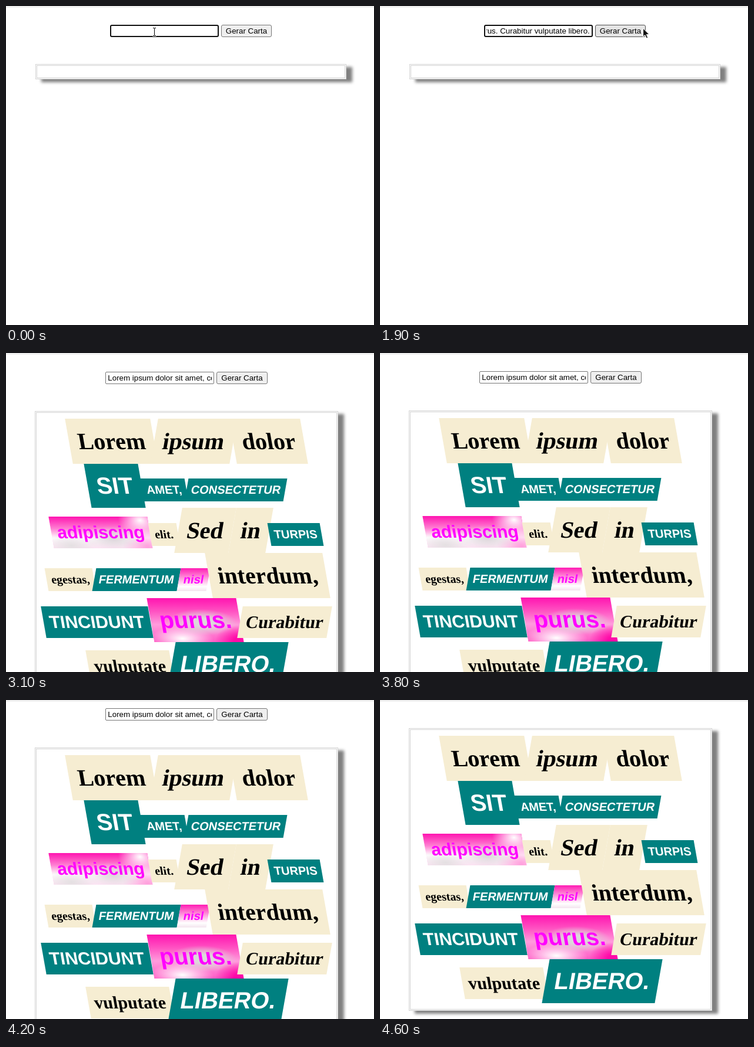
Recreate the animation shown at these times as an HTML page. Size 626 by 544 pixels, loop 5600 ms.

```html
<!DOCTYPE html>
<html lang="pt-BR">
<head>
<meta charset="utf-8">
<title>Carta</title>
<style>
html, body { margin: 0; width: 100%; height: 100%; overflow: hidden; background: #fff; }
#view { position: absolute; left: 0; top: 2px; width: 100%; height: calc(100% - 2px); overflow: hidden; }
#rule { position: absolute; left: 0; top: 1px; width: 100%; height: 1px; background: #dadada; }
#page { position: absolute; left: 0; top: -2px; width: 629px; }
#page.made { width: 614px; }

#form {
  position: absolute; top: 32px; width: 100%; display: flex; justify-content: center; gap: 4px;
  font: 13.3333px/15px "Liberation Sans", Arial, sans-serif; color: #000; white-space: pre;
}
#form > div { box-sizing: border-box; height: 21px; border: 1px solid #767676; }
#field { position: relative; width: 185px; border-radius: 2px; background: #fff; }
#field.focus { border: 2px solid #101010 !important; border-radius: 3px; }
#clip { position: absolute; left: 3px; top: 2px; width: 177px; height: 15px; overflow: hidden; display: flex; }
.focus #clip { left: 2px; top: 1px; justify-content: flex-end; }
.focus #typed { margin-right: 1px; }
#caret { position: absolute; top: 0; width: 1px; height: 15px; background: #000; }
#button { padding: 2px 7px; border-radius: 3px; background: #efefef; }
#button.hover { background: #e5e5e5; border-color: #4f4f4f !important; }

#letter {
  position: absolute; left: 8%; top: 99px; width: 84%; box-sizing: border-box;
  min-height: 26px; padding: 10px; border: 3px double #d3d3d3; background: #fff;
  box-shadow: 10px 5px 5px gray; text-align: center; font: 16px "Liberation Serif", serif;
}
.word { display: inline-block; font-weight: bold; }
.news { background: #f6edd2; color: #000; }
.teal, .pink { font-family: "Liberation Sans", Arial, sans-serif; }
.teal { background: #008080; color: #fff; text-transform: uppercase; }
.pink { color: #f0f; }
.medium { font-size: 20px; padding: 8px; }
.big { font-size: 30px; padding: 10px; }
.huge { font-size: 40px; padding: 15px; }
.left { transform: skewX(10deg); }
.right { transform: skewX(-10deg); }
.loaded .pink { background: linear-gradient(#ff1cb4, #ff9ddc 45%, #fff 80%, #f3e4ee); }
.loaded .pink.big {
  background:
    radial-gradient(22% 50% at 92% 12%, #fff, transparent),
    radial-gradient(30% 40% at 62% 70%, #dcd6da, transparent),
    radial-gradient(28% 40% at 18% 92%, #e4e0e2, transparent),
    radial-gradient(25% 45% at 95% 95%, #ff9fdc, transparent),
    linear-gradient(#ff14b0, #ff7fd2 38%, #fff 68%, #ffe3f5);
}
.loaded .pink.huge {
  background:
    radial-gradient(32% 38% at 100% 100%, #ff0aa8 35%, transparent),
    radial-gradient(38% 30% at 58% 55%, #dcd8da 30%, transparent),
    radial-gradient(35% 28% at 32% 92%, #fff, transparent),
    linear-gradient(#ff14b0, #ff52c2 30%, #ff9cdc 60%, #ff5cc6);
}
#pointer { position: absolute; left: 0; top: 0; width: 100%; height: 100%; }
</style>
</head>
<body>
<div id="rule"></div>
<div id="view">
  <div id="page">
    <div id="form">
      <div id="field"><div id="clip"><span id="typed"></span><i id="caret"></i></div></div>
      <div id="button">Gerar Carta</div>
    </div>
    <div id="letter"></div>
  </div>
</div>
<svg id="pointer">
  <g id="beam" fill="none">
    <path id="stem" d="M249.5 37.5h2l1 1 1-1h2M252.5 38v12M249.5 50.5h2l1-1 1 1h2" stroke="#fff" stroke-width="2.4"/>
    <use href="#stem"/>
    <path d="M250 37.5h2l.5 .5 .5-.5h2M252.5 38v12M250 50.5h2l.5-.5 .5 .5h2" stroke="#000"/>
  </g>
  <path id="arrow" d="M1.5 1V15.5L4.8 12.5L7.3 18L9.7 17L7.3 11.6H12Z" fill="#111" stroke="#fff"/>
</svg>
<script>
const LOOP = 5600;
const $ = id => document.getElementById(id);
const [page, field, typed, caret, button, letter, beam, arrow] =
  ["page", "field", "typed", "caret", "button", "letter", "beam", "arrow"].map($);

// word, paper, size, lean
const WORDS = `Lorem news huge left
ipsum news huge right
dolor news huge left
sit teal huge left
amet, teal medium left
consectetur teal medium right
adipiscing pink big left
elit. news medium left
Sed news huge right
in news huge right
turpis teal medium left
egestas, news medium left
fermentum teal medium right
nisl pink medium right
interdum, news huge left
tincidunt teal big left
purus. pink huge left
Curabitur news big right
vulputate news big left
libero. teal huge right`.split("\n").map(line => line.split(" "));

const TEXT = WORDS.map(w => w[0]).join(" ");

// time, x, y of the arrow
const PATH = [
  [1400, 377, 38], [1600, 425, 38], [1700, 462, 38], [1800, 476, 38], [1900, 446, 37],
  [2100, 424, 36], [2200, 420, 35], [2400, 428, 37], [2500, 448, 43], [2600, 484, 53],
  [2700, 530, 66], [2800, 574, 79], [2900, 606, 87]
];
const SCROLL = [0, 1, 3, 6, 11, 18, 29, 40, 47, 51];

for (const [text, ...kinds] of WORDS) {
  const word = document.createElement("span");
  word.className = "word " + kinds.join(" ");
  word.textContent = text;
  letter.append(word);
}
const words = [...letter.children];
const show = (el, on) => { el.style.display = on ? "" : "none"; };

function draw(t) {
  const made = t >= 2100;
  const pasted = t >= 1200;
  page.classList.toggle("made", made);
  field.classList.toggle("focus", !made);
  typed.textContent = pasted ? TEXT : "";
  show(caret, (t >= 100 && t < 700) || (pasted && t < 1700));
  caret.style.left = pasted ? "176px" : "0";

  words.forEach(word => show(word, made));
  letter.classList.toggle("loaded", t >= 2400);

  const step = Math.floor((t - 3700) / 100);
  const scroll = SCROLL[Math.max(0, Math.min(step, SCROLL.length - 1))];
  page.style.top = -2 - scroll + "px";

  const spot = PATH.filter(p => p[0] <= t).pop();
  const visible = spot && t < 3100;
  show(beam, !spot);
  show(arrow, visible);
  if (visible) arrow.setAttribute("transform", `translate(${spot[1]} ${spot[2]})`);
  const edge = made ? 358 : 366;
  button.classList.toggle("hover", !!visible && spot[1] >= edge && spot[1] < edge + 86 && spot[2] < 53);
}

const start = performance.now();
function tick() {
  draw((performance.now() - start) % LOOP);
  requestAnimationFrame(tick);
}
draw(0);
requestAnimationFrame(tick);
</script>
</body>
</html>
```
